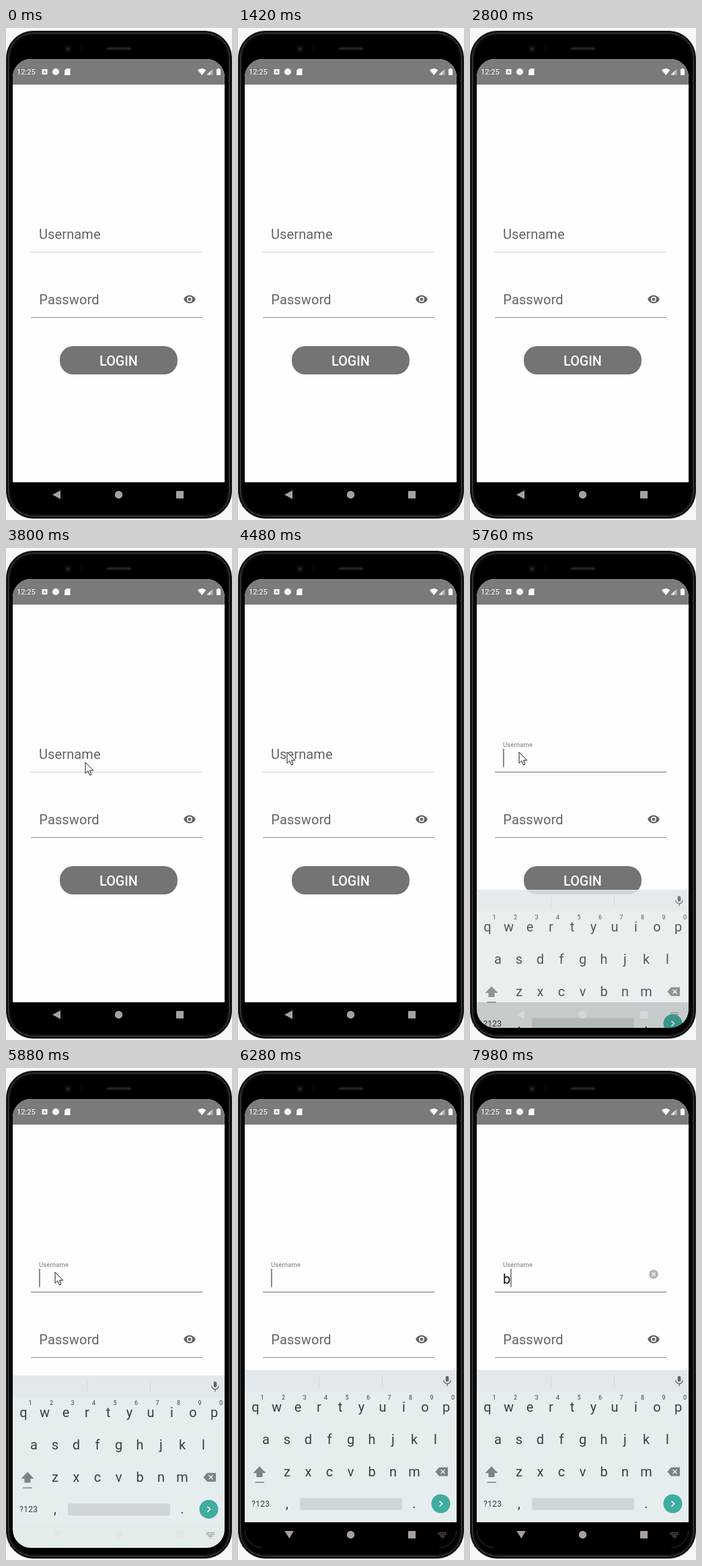
An HTML page that plays this animation: 336 by 730 pixels, repeating every 8 s.

```html
<!DOCTYPE html>
<html lang="en">
<head>
<meta charset="utf-8">
<title>Login</title>
<style>
html, body { margin: 0; width: 100%; height: 100%; overflow: hidden; background: #f7f7f7; }
svg { display: block; width: 100vw; height: 100vh; }
text { font-family: Roboto, "Noto Sans", sans-serif; white-space: pre; }
.hint { font-size: 20px; letter-spacing: .12px; }
</style>
</head>
<body>
<svg viewBox="0 0 336 730">
  <defs>
    <clipPath id="screen"><rect x="10" y="46" width="315" height="666" rx="27"/></clipPath>
  </defs>

  <!-- Phone body -->
  <rect x=".5" y="4.5" width="335" height="723" rx="40" fill="#08080a" stroke="#2c2c2e"/>
  <rect x="3.5" y="7.5" width="329" height="717" rx="37" fill="none" stroke="#515154"/>
  <rect x="5.5" y="9.5" width="325" height="713" rx="35" fill="#000" stroke="#1a1a1c"/>
  <circle cx="92" cy="31" r="6" fill="#0b0b0e"/>
  <circle cx="92" cy="31" r="2.5" fill="#232328"/>
  <circle cx="112" cy="30" r="3.5" fill="#09090b"/>
  <rect x="150" y="28.5" width="36" height="4" rx="2" fill="#222224"/>

  <g clip-path="url(#screen)">
    <rect x="10" y="46" width="315" height="628" fill="#fdfdfd"/>
    <rect x="10" y="46" width="315" height="38" fill="#7b7b7a"/>

    <!-- Status bar -->
    <g fill="#fbfbfb">
      <text x="16" y="69" font-size="11.2">12:25</text>
      <rect x="53.5" y="61" width="8" height="8" rx="1"/>
      <path d="M55.7 67 57.5 62.8 59.3 67M56.4 65.7H58.6" fill="none" stroke="#7b7b7a"/>
      <circle cx="74" cy="65" r="5"/>
      <path d="M90 60H95.5V70H87V63Z"/>
      <path d="M285 62.5Q291.3 57.5 297.5 62.5L291.3 70Z"/>
      <path d="M307.5 60.5V69.5H298.5Z" opacity=".45"/>
      <path d="M304 64V69.5H298.5Z"/>
      <path d="M313 61H314.7V60H317.3V61H319V70H313Z"/>
    </g>

    <!-- Form -->
    <rect id="nameLine" x="37" y="332" width="255" height="1"/>
    <text id="label" class="hint">Username</text>
    <text id="typed" x="49" y="320" font-size="20" fill="#111">b</text>
    <rect id="caret" y="298" width="1.4" height="27" fill="#5c5c66"/>
    <g id="clear">
      <circle cx="273" cy="306" r="6.8" fill="#6c6c6c"/>
      <path d="M270.5 303.5l5 5m0-5l-5 5" stroke="#fdfdfd" stroke-width="1.4"/>
    </g>
    <text class="hint" x="49.3" y="409.5" fill="#636363">Password</text>
    <path transform="translate(263.4 393) scale(.8)" fill="#626262" d="M12 4.5C7 4.500 2.700 7.600 1 12c1.700 4.400 6 7.500 11 7.500s9.300-3.100 11-7.500C21.300 7.600 17 4.500 12 4.500zM12 17a5 5 0 110-10 5 5 0 010 10zm0-8a3 3 0 100 6 3 3 0 000-6z"/>
    <rect x="37" y="429" width="255" height="1" fill="#8e8e90"/>
    <rect x="80" y="472" width="175" height="42" rx="20" fill="#747474"/>
    <text x="167.5" y="501" font-size="19.8" font-weight="500" text-anchor="middle" fill="#fdfdfd">LOGIN</text>

    <!-- Keyboard -->
    <rect x="10" y="674" width="315" height="38" fill="#000"/>
    <g id="board">
      <rect x="10" y="448" width="315" height="300" fill="#e6edef"/>
      <rect x="10" y="448" width="315" height="32" fill="#e1e7ea"/>
      <path d="M120.5 455V473M214.5 455V473" stroke="#d1d7da"/>
      <g fill="#606668">
        <rect x="308.7" y="457" width="4.6" height="8.5" rx="2.3"/>
        <path d="M306 463.5a5 5 0 0010 0M311 468.5V472" fill="none" stroke="#606668" stroke-width="1.3"/>
      </g>
      <g id="keys" fill="#373f42" text-anchor="middle"></g>
      <g fill="#7b8386">
        <path d="M32 591L41.5 601H36.5V607H27.5V601H22.5Z"/>
        <rect x="25.5" y="614" width="13.5" height="1.5"/>
        <path d="M299 592.5H312V605.5H299L293.5 599Z"/>
      </g>
      <path d="M301.5 596l6 6m0-6l-6 6" stroke="#e6edef" stroke-width="1.5"/>
      <rect x="92" y="638" width="152" height="18" rx="3" fill="#cfd5d8"/>
      <circle cx="301.5" cy="646.5" r="14" fill="#40ada0"/>
      <path d="M299.5 642.5l4 4-4 4" fill="none" stroke="#f4fbfa" stroke-width="1.6"/>
    </g>

    <!-- Navigation bar -->
    <rect id="navShade" x="10" y="674" width="315" height="38" fill="#000"/>
    <g id="nav">
      <path id="back" d="M69 692.5L81 686V699Z"/>
      <path id="down" d="M69.5 687H83L76.2 698Z"/>
      <circle cx="167.5" cy="692.5" r="5.7"/>
      <rect x="253" y="687" width="11" height="11"/>
      <g id="imeIcon" fill="none" stroke="#808080">
        <path d="M298 689.5H310M298 692H310" stroke-width="1.5" stroke-dasharray="1.5 1"/>
        <path d="M300.5 694.5H307.5M302.5 697H305.5" stroke-width="1.2"/>
      </g>
    </g>
  </g>

  <path id="mouse" d="M0 0V16.5L3.8 12.9 6.5 19 9 17.9 6.4 12H11.8Z" fill="#fdfdfd" stroke="#1c1c1c"/>
</svg>

<script>
const LOOP = 8000;
const $ = id => document.getElementById(id);
const clamp = v => Math.max(0, Math.min(1, v));
const span = (t, from, to) => clamp((t - from) / (to - from));
const mix = (a, b, p) => a + (b - a) * p;
const smooth = p => p * p * (3 - 2 * p);
const easeIn = p => p * p;
const easeOut = p => 1 - (1 - p) ** 3;
const gray = (a, b, p) => `rgb(${Array(3).fill(Math.round(mix(a, b, p)))})`;
const show = (id, on) => $(id).setAttribute("opacity", Number(on));
const move = (id, x, y, s = 1) => $(id).setAttribute("transform", `translate(${x} ${y}) scale(${s})`);

function key(char, x, y, size) {
  const el = document.createElementNS("http://www.w3.org/2000/svg", "text");
  el.setAttribute("x", x);
  el.setAttribute("y", y);
  el.setAttribute("font-size", size);
  el.textContent = char;
  $("keys").append(el);
}

[["qwertyuiop", 26, 510], ["asdfghjkl", 41.5, 558], ["zxcvbnm", 73, 606]].forEach(([row, x, y]) =>
  [...row].forEach((char, i) => key(char, x + i * 31.5, y, 20)));
[..."1234567890"].forEach((char, i) => key(char, 36 + i * 31.5, 492, 9));
key("?123", 33.5, 651, 12.5);
key(",", 73, 653, 20);
key(".", 262, 653, 20);

// Pointer legs: start, end, both points, easing
const legs = [
  [2960, 3760, 338, 398, 118, 318, easeOut],
  [3920, 4480, 118, 318, 73, 303, smooth],
  [5880, 6200, 73, 303, 338, 400, easeIn]
];

function pointer(t) {
  const [from, to, x0, y0, x1, y1, ease] = legs.filter(leg => t >= leg[0]).pop() || legs[0];
  const p = ease(span(t, from, to));
  move("mouse", mix(x0, x1, p), mix(y0, y1, p));
  show("mouse", t >= 2960 && t < 6200);
}

function draw(t) {
  pointer(t);

  const focus = smooth(span(t, 5060, 5230));
  move("label", 49, mix(313, 295, focus), mix(1, .48, focus));
  $("label").setAttribute("fill", gray(99, 122, focus));
  $("nameLine").setAttribute("fill", gray(206, 112, focus));

  const typed = t >= 7900;
  const blinkOn = t < 6000 || Math.floor((t - 6000) / 500) % 2 === 0;
  show("caret", t >= 5230 && (typed || blinkOn));
  $("caret").setAttribute("x", typed ? 60.2 : 49.2);
  show("typed", typed);
  show("clear", .5 * span(t, 7900, 7980));

  const slide = span(t, 5600, 6010);
  const rise = easeOut(slide);
  const shade = span(t, 5880, 6040);
  move("board", 0, mix(264, 0, rise));
  show("board", clamp(slide * 2.2));
  show("navShade", shade);
  $("nav").setAttribute("fill", gray(162, 232, rise * (1 - shade)));
  const open = t >= 5880;
  show("back", !open);
  show("down", open);
  show("imeIcon", t >= 5400);
}

function tick() {
  draw(performance.now() % LOOP);
  requestAnimationFrame(tick);
}
tick();
</script>
</body>
</html>
```
